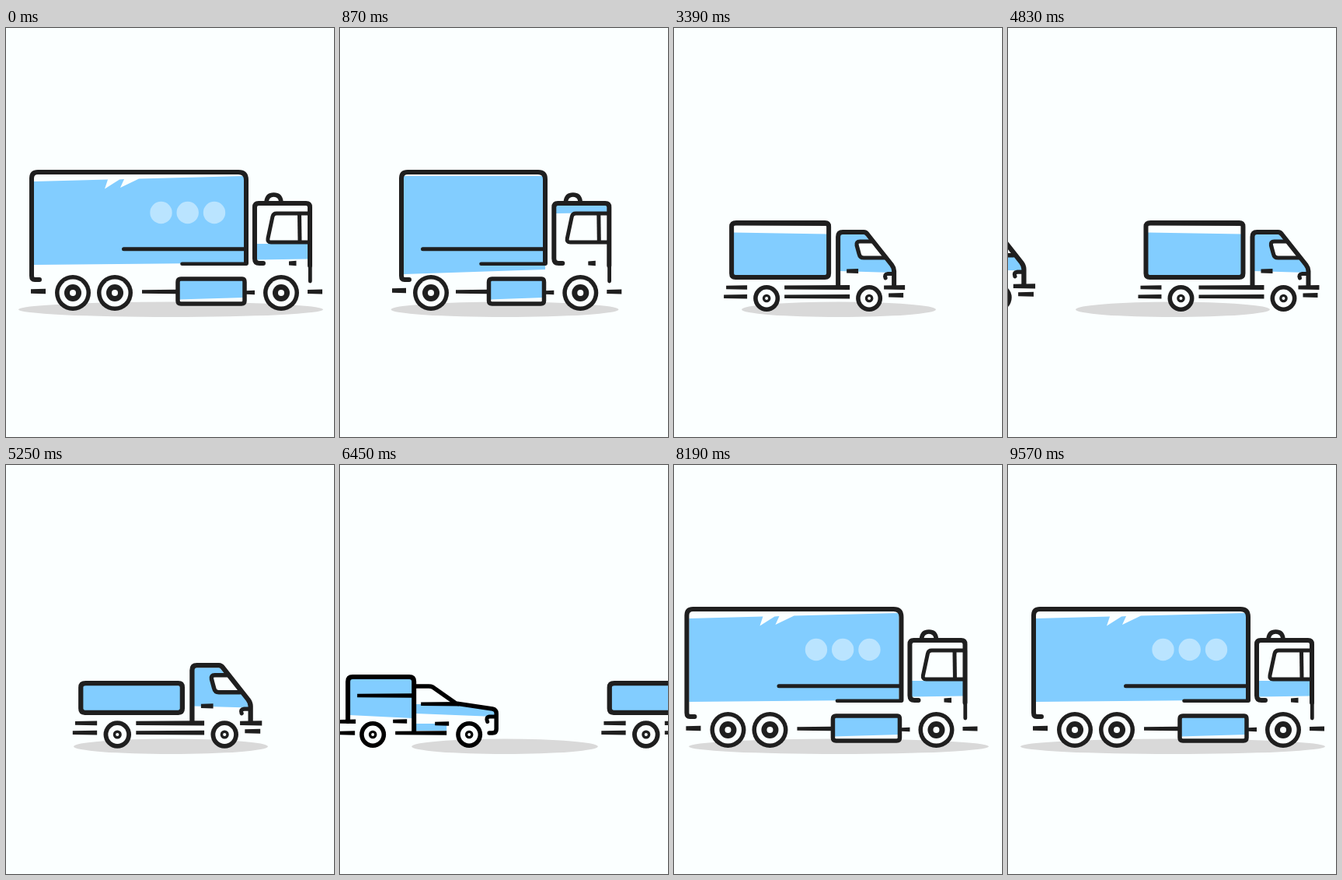
Animation, 422 px wide and 525 px high, one loop 9.63 s. Source, as an HTML page with a canvas:

```html
<!DOCTYPE html>
<html lang="en">
<head>
<meta charset="utf-8">
<title>Delivery vehicles</title>
<style>
  html, body { margin: 0; width: 100%; height: 100%; overflow: hidden; background: #fbffff; }
  canvas { display: block; width: 422px; height: 525px; }
</style>
</head>
<body>
<canvas id="stage"></canvas>
<script>
const W = 422, H = 525, LOOP = 9630, STEP = 30;
const PAPER = '#fbffff', BLUE = '#82cdff', PALE = '#bae4ff', SHADE = '#d9d9d9';
const canvas = document.getElementById('stage');
const ctx = canvas.getContext('2d');
const dpr = window.devicePixelRatio || 1;
canvas.width = W * dpr;
canvas.height = H * dpr;
ctx.lineJoin = 'round';

let ink = '#1f1f1f';

function fill(d, color = BLUE) {
  ctx.fillStyle = color;
  ctx.fill(new Path2D(d));
}

function line(d, width = 6, cap = 'round') {
  ctx.lineCap = cap;
  ctx.lineWidth = width;
  ctx.strokeStyle = ink;
  ctx.stroke(new Path2D(d));
}

// Slightly tapered horizontal stroke
function bar(x1, x2, y, h = 5.5, taper = 0.5) {
  fill(`M${x1} ${y - h / 2 + taper}L${x2} ${y - h / 2}V${y + h / 2}L${x1} ${y + h / 2 - taper}Z`, ink);
}

function disc(x, y, r, color) {
  ctx.fillStyle = color;
  ctx.beginPath();
  ctx.arc(x, y, r, 0, Math.PI * 2);
  ctx.fill();
}

function wheel(x, y, r, rim, hub, hole) {
  disc(x, y, r, ink);
  disc(x, y, r - rim, PAPER);
  disc(x, y, hub, ink);
  disc(x, y, hole, PAPER);
}

const bigWheel = x => wheel(x, 340, 23, 5.5, 11, 4);
const smallWheel = (x, y, r = 17) => wheel(x, y, r, 5.6, 5.3, 2);

function tank(l, r) {
  fill(`M${l} 319H${r}V354H${l}Z`, PAPER);
  fill(`M${l} 323H${r}V346L${l} 348.5Z`);
  line(`M${l + 4} 322H${r - 3}Q${r} 322 ${r} 326V350Q${r} 354 ${r - 4} 354H${l + 4}Q${l} 354 ${l} 350V326Q${l} 322 ${l + 4} 322Z`, 5.5);
}

function tallCab(top, bottom) {
  fill(`M322 ${top}H389V${bottom - 1}L322 ${bottom}Z`);
  line('M331 302H326Q320 302 320 296V230Q320 225 325 225H386Q391 225 391 230V305');
  line('M391.3 238V325', 4.8);
  line('M390 238H348Q344 238 343 242L337 270Q336 275 341 275H390', 5);
  line('M377.5 239L378 274', 5, 'butt');
  line('M335 223Q336 214 344.5 214Q353 214 354 223', 5.5);
  bar(364, 373.5, 302, 6.5, 0.8);
  bar(388, 407, 338.5, 6);
  bar(309, 320, 339.5, 5.5);
  bigWheel(354);
}

function longTruck() {
  fill('M36 197L131 194.5L127 206.5L146 194.5L152 194L147 205L171 193.5L306 190V301.5L36 304Z');
  for (const x of [199.5, 233.7, 268]) disc(x, 237, 14.2, PALE);
  line('M43 323H37Q33 323 33 318V193Q33 185 41 185H299Q309 185 309 195V302');
  line('M151.5 283.8H307', 5);
  line('M226.5 302.8H308', 4.6);
  bar(32, 51, 338, 6.5);
  bar(175, 220, 338.5);
  tank(221, 307);
  bigWheel(86);
  bigWheel(140);
  tallCab(277, 297.5);
}

function mediumTruck() {
  fill('M82 190H262L264 310L82 316Z');
  line('M89 323H83Q79 323 79 318V193Q79 185 87 185H255Q264 185 264 194V302');
  line('M106.5 283.8H263', 5);
  line('M181.5 302.8H263', 4.6);
  bar(67, 85, 337, 6.5);
  bar(149, 191, 338.5);
  tank(191.5, 262.5);
  bigWheel(117);
  ctx.translate(-44.7, 0);
  tallCab(227, 238);
}

function van() {
  fill('M89 256H262L305 300V307H89Z');
  fill('M145 329H262L254 342H147Z');
  fill('M241 264L264 261L293 289H247Z', PAPER);
  line('M101 329.5H91Q87 329.5 87 325V259Q87 253 93 253H261Q265 253 267 255L305 298Q308 302 308 306V327');
  line('M261 263H243Q239 263 240 267L244 285Q245 289 249 289H295', 5.5);
  line('M264.5 264L265.5 288', 4.5, 'butt');
  bar(89, 155, 265.7);
  line('M88 307.5H230.5', 5);
  bar(246, 259, 307, 6.5);
  line('M304 308.5H296Q291 309 293 313L296.5 318', 5);
  bar(158, 249, 342.7, 6.5);
  bar(84, 104, 342.7, 6.5);
  bar(298, 314, 342.5, 6.5);
  smallWheel(130, 344, 18);
  smallWheel(273, 344, 18);
}

function lightTruck(top, level) {
  fill(`M179 ${level}L300 ${level + 2}V318H179Z`);
  fill('M316 265H348L384 308V314L316 312Z');
  fill('M340 274H357L373 295H343Z', PAPER);
  line(`M183 ${top}H297Q302 ${top} 302 ${top + 5}V315Q302 320 297 320H182Q177 320 177 315V${top + 5}Q177 ${top} 183 ${top}Z`);
  line('M314 331V268Q314 262 320 262H347Q350 262 352 265L383 304Q386 308 386 312V331');
  line('M357 274H342Q337 274 338 279L341 290Q342 295 347 295H373', 5.2);
  line('M384 315.5H378Q373 316 375 321', 5);
  bar(325, 340, 312, 6);
  bar(170, 197, 333);
  bar(167, 197, 344.7);
  bar(245, 329, 333, 6);
  bar(245, 329, 344.7);
  bar(373, 400, 333, 6);
  bar(379, 398, 343, 5.8);
  smallWheel(222, 347);
  smallWheel(354, 347);
}

function boxTruck() {
  lightTruck(250, 262.5);
  bar(178, 301, 251.5, 5);
}

function lowTruck() {
  ctx.transform(1.045, 0, 0, 1.045, -85.4, -16.6);
  lightTruck(284, 285);
}

function pickup() {
  ink = '#000';
  fill('M127 274H208V325L127 321Z');
  fill('M212 307L264 307L314 315V323L212 319Z');
  fill('M212 332H252V341H212Z');
  line('M125 329V278Q125 272 131 272H204Q210 272 210 278V342');
  line('M212 284H229Q232 284 234 285L264 306L311 313Q316 314 316 319V339Q316 344 311 344H307', 5.5);
  line('M314 323H307Q302 324 304.5 329.5', 5);
  bar(137, 208, 296);
  bar(219, 268, 306.7);
  bar(106, 135, 329.3);
  bar(113, 134, 344);
  bar(183, 201, 329);
  bar(186, 252, 344);
  bar(237, 255, 332);
  smallWheel(157, 346);
  smallWheel(281, 346);
}

// start: departure time; travel: distance to the next vehicle; shadow: half width
const fleet = [
  { draw: longTruck,   home: 0,   start: 0,    travel: 464, shadow: 196 },
  { draw: mediumTruck, home: 0,   start: 1650, travel: 387, shadow: 146.5 },
  { draw: van,         home: 7.8, start: 3210, travel: 367, shadow: 125 },
  { draw: boxTruck,    home: -75, start: 4800, travel: 373, shadow: 125 },
  { draw: lowTruck,    home: 0,   start: 6360, travel: 362, shadow: 125 },
  { draw: pickup,      home: 0,   start: 7950, travel: 434, shadow: 117.5 }
];

// Quick surge followed by a long soft tail
function glide(s) {
  const surge = 0.883 * (1 + 28.2 * s) * Math.exp(-28.2 * s);
  const tail = 0.117 * Math.exp(-5.5 * s);
  return s <= 0 ? 0 : 1 - Math.max(0, surge + tail - 0.001);
}

function place(v, x) {
  if (x > W || x < -500) return;
  ctx.save();
  ctx.translate(v.home + x, 0);
  ink = '#1f1f1f';
  v.draw();
  ctx.restore();
}

function render(ms) {
  const t = Math.floor((ms % LOOP) / STEP) * STEP;
  const i = fleet.findLastIndex(v => v.start <= t);
  const now = fleet[i], next = fleet[(i + 1) % fleet.length];
  const p = glide((t - now.start) / 1000);

  ctx.setTransform(dpr, 0, 0, dpr, 0, 0);
  ctx.fillStyle = PAPER;
  ctx.fillRect(0, 0, W, H);
  ctx.fillStyle = SHADE;
  ctx.beginPath();
  ctx.ellipse(212, 361.3, now.shadow + (next.shadow - now.shadow) * p, 9.7, 0, 0, Math.PI * 2);
  ctx.fill();
  place(now, now.travel * p);
  place(next, now.travel * (p - 1));
}

let origin = null;
function tick(time) {
  if (origin === null) origin = time;
  render(time - origin);
  requestAnimationFrame(tick);
}
render(0);
requestAnimationFrame(tick);
</script>
</body>
</html>
```
